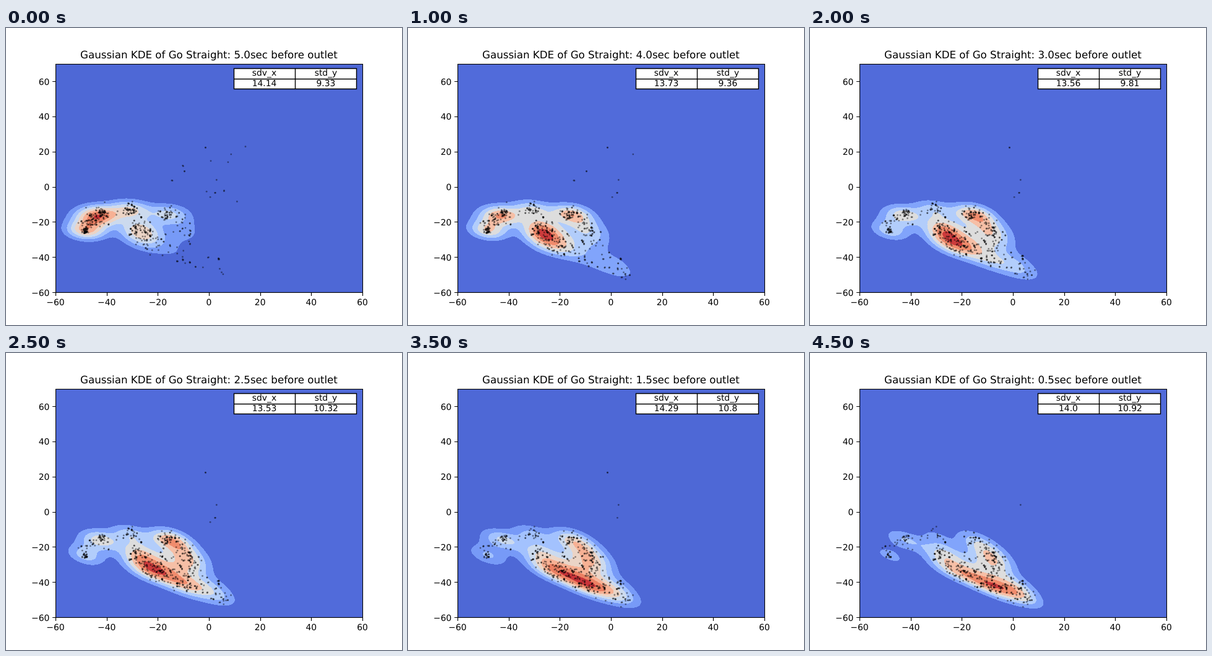
Animation, 640 px wide and 480 px high, one loop 5000 ms. Source, as an HTML page with a canvas:

```html
<!DOCTYPE html>
<html lang="en">
<head>
<meta charset="utf-8">
<title>Density before outlet</title>
<style>
html, body { margin: 0; width: 100%; height: 100%; overflow: hidden; background: #fff; }
canvas { position: absolute; left: 80px; top: 58px; }
svg { position: absolute; left: 0; top: 0; width: 640px; height: 480px; }
text { font: 13.89px "DejaVu Sans", sans-serif; text-anchor: middle; text-rendering: geometricPrecision; }
#title { font-size: 16.67px; }
#ylab text { text-anchor: end; }
#dots { fill: #000; fill-opacity: .43; }
.line { fill: none; stroke: #000; stroke-width: 1.11; }
</style>
</head>
<body>
<canvas id="field" width="496" height="369"></canvas>
<svg viewBox="0 0 640 480">
  <g id="dots"></g>
  <path id="ticks" class="line"/>
  <rect class="line" x="80.5" y="58.5" width="496" height="369"/>
  <g id="xlab"></g><g id="ylab"></g>
  <rect x="368.5" y="65.5" width="198" height="33" fill="#fff"/>
  <path class="line" style="stroke-width:1.4" d="M368.5 65.5h198v33h-198zM368.5 82.5h198M467.5 65.5v33"/>
  <text x="417.5" y="77">sdv_x</text><text x="517" y="77">std_y</text>
  <text id="sx" x="417.5" y="94"></text><text id="sy" x="517" y="94"></text>
  <text id="title" x="328" y="49"></text>
</svg>
<script>
const $ = id => document.getElementById(id);
const STEP = 500;
const LEFT = 80, TOP = 58, W = 496, H = 369;
const X_UNIT = 496 / 120, Y_UNIT = 369.6 / 130;

// Per step: spread in x, spread in y, height of the peak in bands
const STEPS = ['14.14 9.33 7.2', '13.91 9.31 6.8', '13.73 9.36 6.6', '13.08 9.88 7.4', '13.56 9.81 6.6',
  '13.53 10.32 6.5', '13.49 10.78 6.5', '14.29 10.8 7.5', '14.17 10.86 6.6', '14.0 10.92 6.2'];

// Groups of points: centre, spread along and across, angle, then size at steps 0, 3, 6 and 9
const GROUPS = [
  [128, 328, 3, 3, 0, 60, 33, 23, 15],
  [156, 301, 4, 3, 0, 43, 29, 30, 21],
  [140, 308, 12, 8, -30, 105, 49, 27, 17],
  [200, 293, 10, 5, 0, 67, 38, 36, 14],
  [213, 324, 9, 10, 0, 67, 77, 45, 59],
  [225, 337, 12, 8, 50, 50, 60, 6, 2],
  [238, 353, 18, 6, 20, 12, 58, 74, 61],
  [262, 344, 22, 12, 25, 15, 55, 77, 59],
  [262, 300, 8, 5, 0, 46, 61, 44, 13],
  [285, 320, 18, 8, 48, 30, 79, 71, 74],
  [300, 345, 9, 14, 0, 6, 24, 49, 55],
  [290, 375, 18, 6, 20, 12, 16, 82, 82],
  [330, 382, 12, 10, 0, 10, 32, 38, 77],
  [352, 398, 5, 5, 0, 3, 12, 13, 18],
  [340, 245, 40, 30, 0, 20, 7, 5, 1]
];

// Cool to warm ramp, smoothed between its stops
const RAMP = [[59, 76, 192], [98, 130, 234], [141, 176, 254], [184, 208, 249], [221, 221, 221],
  [245, 196, 173], [244, 154, 123], [222, 96, 77], [180, 4, 38]];
function color(u) {
  const x = u * 8, i = Math.min(7, Math.floor(x)), t = x - i;
  return RAMP[i].map((b, j) => {
    const c = RAMP[i + 1][j];
    const a = i > 0 ? RAMP[i - 1][j] : 2 * b - c;
    const d = i < 7 ? RAMP[i + 2][j] : 2 * c - b;
    return b + t / 2 * (c - a + t * (2 * a - 5 * b + 4 * c - d + t * (3 * (b - c) + d - a)));
  });
}

function random(seed) {
  return () => (seed = (seed * 16807) % 2147483647) / 2147483647;
}

// The groups as they stand at step i, with their covariance
function groupsAt(i) {
  const k = Math.min(2, Math.floor(i / 3)), t = i / 3 - k;
  return GROUPS.map(([x, y, along, across, deg, ...sizes]) => {
    const c = Math.cos(deg * Math.PI / 180), s = Math.sin(deg * Math.PI / 180);
    const a = along * along, b = across * across;
    return { x, y, c, s, along, across, size: sizes[k] + (sizes[k + 1] - sizes[k]) * t,
      xx: a * c * c + b * s * s, yy: a * s * s + b * c * c, xy: (a - b) * c * s };
  });
}

// Sum of the groups, each widened by the kernel
function density(groups, kx, ky, tilt) {
  const field = new Float32Array(W * H);
  for (const g of groups) {
    const xx = g.xx + kx * kx, yy = g.yy + ky * ky, xy = g.xy + tilt * kx * ky;
    const det = xx * yy - xy * xy, top = g.size / Math.sqrt(det);
    for (let py = 0; py < H; py++) {
      const dy = py + TOP - g.y;
      if (dy * dy > 18 * yy) continue;
      for (let px = 0; px < W; px++) {
        const dx = px + LEFT - g.x;
        const q = (dx * dx * yy - 2 * dx * dy * xy + dy * dy * xx) / det;
        if (q < 18) field[py * W + px] += top * Math.exp(-q / 2);
      }
    }
  }
  return field;
}

function paint(field, peak) {
  const ctx = $('field').getContext('2d'), image = ctx.createImageData(W, H);
  const n = Math.ceil(peak), scale = peak / field.reduce((a, b) => Math.max(a, b));
  const bands = Array.from({ length: n }, (_, i) => [...color((i + .5) / n), 255]);
  field.forEach((v, i) => image.data.set(bands[Math.min(n - 1, Math.floor(v * scale))], i * 4));
  ctx.putImageData(image, 0, 0);
}

// Some points stay close to the one before, as slow tracks do
function scatter(g, seed) {
  const r = random(seed), bell = () => (r() + r() + r() - 1.5) * 2;
  let u = 0, v = 0;
  return Array.from({ length: Math.round(g.size) }, () => {
    const near = r() < .35, a = bell(), b = bell();
    u = near ? u + a * .6 : a * g.along;
    v = near ? v + b * .6 : b * g.across;
    return [g.x + u * g.c - v * g.s, g.y + u * g.s + v * g.c];
  });
}

function show(i) {
  const [sx, sy, peak] = STEPS[i].split(' ');
  const groups = groupsAt(i), width = .36;
  $('title').textContent = `Gaussian KDE of Go Straight: ${(5 - i / 2).toFixed(1)}sec before outlet`;
  $('sx').textContent = sx;
  $('sy').textContent = sy;
  paint(density(groups, sx * X_UNIT * width, sy * Y_UNIT * width, .15 + .06 * i), +peak);
  $('dots').innerHTML = groups.flatMap((g, j) => scatter(g, 7919 * (j + 3))).map(([x, y]) =>
    `<circle cx="${x.toFixed(1)}" cy="${y.toFixed(1)}" r="1.4"/>`).join('');
}

function axes() {
  const label = (v, x, y) => `<text x="${x}" y="${y}">${String(v).replace('-', '\u2212')}</text>`;
  let d = '', xs = '', ys = '';
  for (let v = -60; v <= 60; v += 20) {
    const x = 328 + v * X_UNIT, y = 427.2 - (v + 60) * Y_UNIT;
    d += `M${Math.round(x) + .5} 428v4.9M80 ${Math.round(y) + .5}h-4.9`;
    xs += label(v, x, 448);
    ys += label(v, 70.3, Math.round(y + 5.6));
  }
  $('ticks').setAttribute('d', d);
  $('xlab').innerHTML = xs;
  $('ylab').innerHTML = ys;
}

axes();
const start = performance.now();
let shown = -1;
function tick() {
  const i = Math.floor((performance.now() - start) / STEP) % STEPS.length;
  if (i !== shown) show(shown = i);
  requestAnimationFrame(tick);
}
tick();
</script>
</body>
</html>
```
